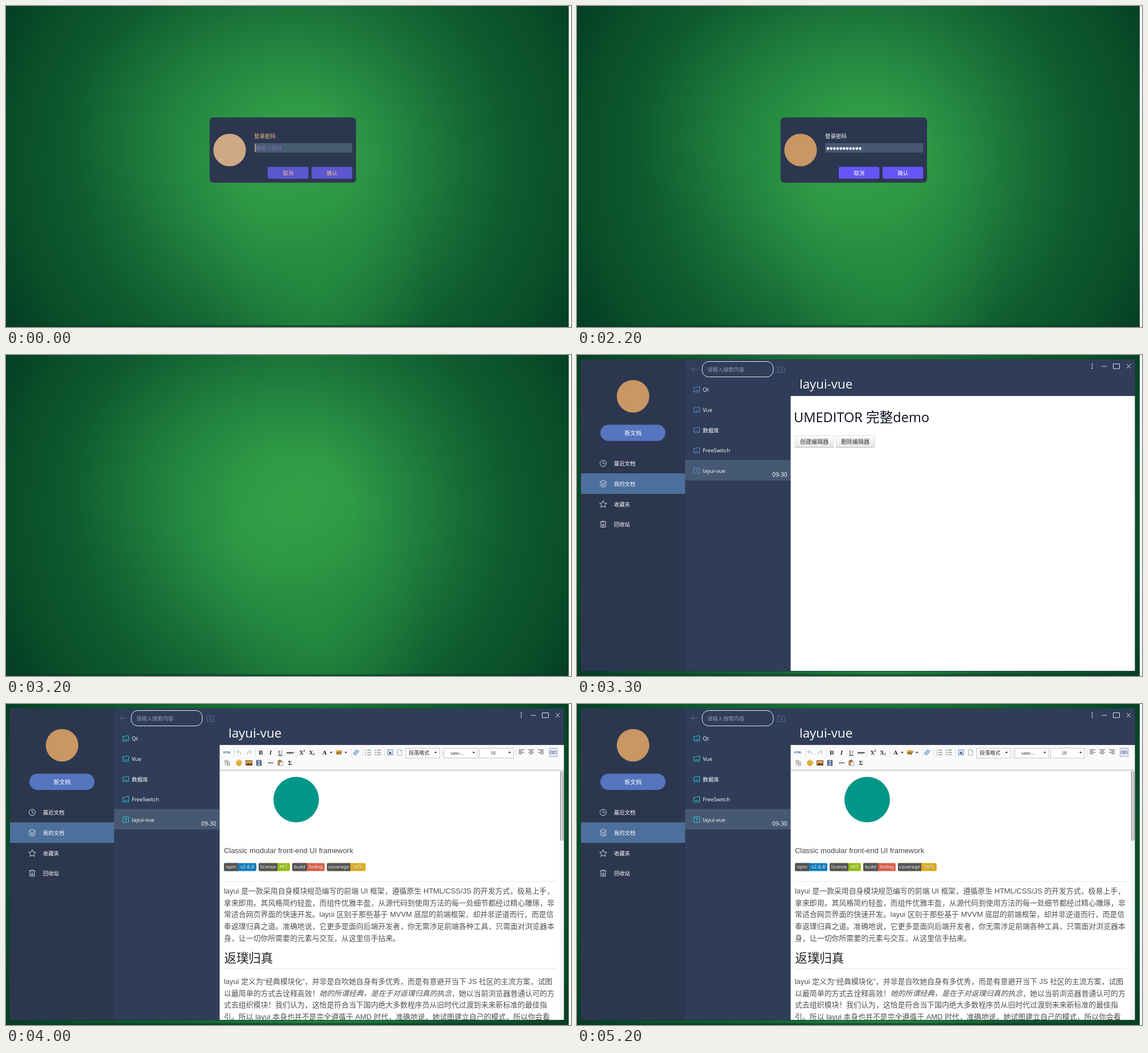
An HTML page for the animation above (5300 ms loop, 993 by 564 pixels).

```html
<!DOCTYPE html>
<html lang="zh-CN">
<head>
<meta charset="utf-8">
<title>Notes login</title>
<style>
html, body { margin: 0; width: 100%; height: 100%; overflow: hidden; background: #fff; }
svg { position: absolute; left: 0; top: 0; display: block; }
#bg {
  position: absolute; left: 0; top: 0; width: 989px; height: 564px;
  background:
    linear-gradient(#0000 561px, #0a3a25b0 561px),
    radial-gradient(ellipse 190px 260px at 550px 490px, #27903f99, #27903f00),
    radial-gradient(ellipse 230px 200px at 320px 200px, #2590404d, #25904000),
    radial-gradient(circle at 503px 272px, #35a24a 0, #309b47 100px, #238440 200px,
      #176c36 300px, #0e5a2e 390px, #0a5029 480px, #043e25 570px);
}
.ui { font-family: "Open Sans", "Noto Sans CJK SC", "Noto Sans CJK", sans-serif; }
.doc { font-family: "Liberation Sans", "Noto Sans CJK SC", "Noto Sans CJK", sans-serif; }
.serif { font-family: "Liberation Serif", serif; }
.badge { font-family: "DejaVu Sans", sans-serif; }
text { white-space: pre; }
</style>
</head>
<body>
<div id="bg"></div>
<svg id="stage" width="993" height="564" viewBox="0 0 993 564"></svg>
<script>
const LOOP = 5300, STEP = 100;

// Drawing helpers
const rect = (x, y, w, h, fill, r = 0, more = '') =>
  `<rect x="${x}" y="${y}" width="${w}" height="${h}" rx="${r}" style="fill:${fill}" ${more}/>`;
const disc = (x, y, r, fill, more = '') =>
  `<circle cx="${x}" cy="${y}" r="${r}" style="fill:${fill}" ${more}/>`;
const line = (d, color, w = 1, more = '') =>
  `<path d="${d}" style="fill:none;stroke:${color};stroke-width:${w}" ${more}/>`;
const text = (x, y, size, s, fill, cls = 'ui', more = '') =>
  `<text x="${x}" y="${y}" font-size="${size}" class="${cls}" style="fill:${fill}" ${more}>${s}</text>`;
const mid = 'text-anchor="middle"', bold = 'font-weight="700"';
const group = (id, body) => `<g id="${id}">${body}</g>`;

function dialog() {
  const button = (x, s) => rect(x, 282.5, 71.5, 21, 'var(--btn)', 3) +
    text(x + 36, 297, 9.4, s, 'var(--txt)', 'ui', mid);
  let dots = '';
  for (let i = 0; i < 11; i++) dots += disc(441 + i * 5.66, 250.4, 2.3, '#fff', 'class="dot"');
  return rect(357.5, 195.5, 258, 115.5, '#1c504080', 7) +
    rect(358, 196, 257, 114, '#2c374f', 6) +
    disc(393, 253, 28.6, 'var(--ava)') +
    text(436, 232.4, 9.4, '登录密码', 'var(--txt)') +
    rect(436, 241, 172.5, 16.5, 'var(--field)') +
    group('hint', text(438, 253.2, 9.4, '请输入密码', 'var(--hint)')) + dots +
    rect(438, 242, 1, 14, 'var(--txt)', 0, 'id="caret"') +
    button(460, '取消') + button(537, '确认');
}

function sidebar() {
  const icons = [
    'M40.5 190.5a5.5 5.5 0 1 0 11 0a5.5 5.5 0 1 0 -11 0M46 187v4h3.5',
    'M46 220l6 3.2l-6 3.2l-6 -3.2zM40 226.3l6 3.2l6 -3.2M40 229.3l6 3.2l6 -3.2',
    'M46 256l1.9 4l4.3 .5l-3.2 3l.9 4.4l-3.9 -2.2l-3.9 2.2l.9 -4.4l-3.2 -3l4.3 -.5z',
    'M40.5 293h11M42 293v9.5h8v-9.5M44 292h4M44 300l2 -3.5l2 3.5z'
  ];
  const names = ['最近文档', '我的文档', '收藏夹', '回收站'];
  return rect(7, 8, 183, 547, '#2c374f') + disc(98.5, 72.5, 28.6, '#c99664') +
    rect(41, 122.5, 114.5, 28.5, '#5675bf', 14.2) +
    text(98.4, 140.7, 10, '新文档', '#fff', 'ui', mid) +
    rect(7, 208, 183, 36, '#4d6f9c') +
    names.map((s, i) => text(65, 194.2 + i * 35.7, 9.4, s, '#fff') +
      line(icons[i], '#e8ecf2', .9)).join('');
}

function list() {
  const names = ['Qt', 'Vue', '数据库', 'FreeSwitch', 'layui-vue'];
  const icon = (y, last) => last
    ? `M205.5 ${y - 5}h10v10h-10zM208 ${y - 2}h5M210.5 ${y - 2}v5`
    : `M205.5 ${y + 4.5}v-8h5l1 -1.2h4v9.2zM207.5 ${y + 2}h6`;
  return rect(190, 8, 185.5, 547, '#303d58') +
    line('M211.5 25h-10.5M206 20l-5 5l5 5', '#62718c') +
    rect(220, 11.5, 125, 27, '#303d58', 11.5, 'stroke="#e4e8ee"') +
    text(229, 28.6, 9.3, '请输入搜索内容', '#929caf') +
    line('M353 30.5v-10h4.5l1.2 1.5h6.3v8.5zM359 24v4.5M356.7 26.2h4.6', '#536d9b') +
    rect(190, 184.5, 185.5, 36, '#465972') +
    names.map((s, i) => {
      const y = 60.5 + i * 35.65;
      return line(icon(y, i == 4), 'var(--icon)') + text(221, y + 3.8, 9.5, s, '#fff');
    }).join('') +
    text(343, 214, 10.2, '09-30', '#fff');
}

function header() {
  return rect(375, 8, 605.5, 64, '#303d58') + text(391, 59, 22.3, 'layui-vue', '#fff') +
    [15.7, 19.5, 23.3].map(y => disc(905.5, y, 1, '#fff')).join('') +
    line('M922.5 20h8.5M942.5 15.5h11v8.5h-11zM966 16l7 7.5M973 16l-7 7.5', '#dde3ec');
}

function demo() {
  const button = (x, s) => rect(x, 141.5, 68, 21, 'url(#face)', 2, 'stroke="#e2dada"') +
    line(`M${x} 162.5h68`, '#c4bfbf') + text(x + 34, 155.8, 10, s, '#333', 'ui', mid);
  return text(381, 118, 23.6, 'UMEDITOR 完整demo', '#0b0f1c') +
    button(383, '创建编辑器') + button(455, '删除编辑器');
}

function toolbar() {
  const ink = '#222', blue = '#4a78b8';
  const drop = (x, y = 85) => `<path d="M${x - 2.2} ${y - 1}h4.4l-2.2 2.8z" fill="#222"/>`;
  const glyph = (x, s, size = 11, more = '', y = 89) =>
    text(x, y, size, s, ink, 'serif', mid + ' ' + more);
  const select = (x, s, cls, size) => rect(x + .5, 77.5, 59.5, 17.5, '#fff', 0, 'stroke="#c4c4c4"') +
    text(x + 24, 89.3, size, s, ink, cls, mid) + drop(x + 53);
  const rows = (x, w, dx, color = '#555') => w.map((n, i) =>
    line(`M${x + dx * (10 - n)} ${80.5 + i * 2.3}h${n}`, color)).join('');
  const bars = [401, 438, 509, 549, 607, 627, 665, 766, 896]
    .map(x => line(`M${x}.5 78v15`, '#dcdcdc')).join('');
  const numbers = [81, 85, 89].map((y, i) =>
    text(631, y + 1.5, 4, i + 1, blue, 'doc') + line(`M635 ${y}h7`, '#666') +
    disc(649.5, y, 1, blue) + line(`M652 ${y}h7`, '#666')).join('');
  const row1 = text(388.5, 86.5, 4.8, 'HTML', '#3b62a8', 'doc', mid + ' ' + bold) +
    line('M406 84h4.5q3 .5 2 5M408.5 81l-3 3l3 3', '#b9cde2', 1.4) +
    line('M430.5 84h-4.5q-3 .5 -2 5M428 81l3 3l-3 3', '#b9cde2', 1.4) +
    glyph(448, 'B', 11, bold) + glyph(465, 'I', 11, bold + ' font-style="italic"') +
    glyph(482, 'U', 10.5, 'text-decoration="underline"') +
    text(499.5, 87.6, 6, 'ABC', ink, 'doc', mid) + line('M493 85.5h13', ink, .9) +
    glyph(519, 'X', 10, bold) + glyph(524, '2', 6, bold, 84) +
    glyph(536, 'X', 10, bold) + glyph(541.5, '2', 6, bold, 90) +
    glyph(560, 'A', 11, bold) + drop(571.5) +
    rect(580, 81, 9, 8, '#f5b84d') + text(585, 87.5, 7.5, 'ab', ink, 'doc', mid) +
    line('M587 89l4 -7', '#8a5c20', 1.2) + drop(597.5) +
    '<path d="M610 87l6 -7l4.5 3.2l-6 7z" fill="#a9c9e8" stroke="#5c7da5" stroke-width=".8"/>' +
    numbers + rect(670.5, 80.5, 9, 9, '#dbe9f8', 0, 'stroke="#6c90ba"') +
    text(675, 88, 8, 'a', '#223', 'doc', mid + ' ' + bold) +
    line('M688 80h5l2.5 2.5v7.5h-7.5zM693 80v2.5h2.5', '#9aa6b4', .9) +
    select(702, '段落格式', 'ui', 9) + select(769, 'sans-...', 'serif', 8.2) +
    select(832, '18', 'serif', 8.6) +
    rows(901, [10, 6, 10, 6], 0) + rows(918, [10, 6, 10, 6], .5) + rows(935, [10, 6, 10, 6], 1) +
    rect(954.5, 77.5, 14.5, 15, '#dfe5f7', 0, 'stroke="#a9b5da"') +
    rect(956.5, 83, 5.5, 4, 'none', 2, 'stroke="#667"') +
    rect(961.5, 83, 5.5, 4, 'none', 2, 'stroke="#667"');
  const row2 = disc(387, 101.5, 2.4, '#e8e8e8', 'stroke="#777"') +
    disc(391, 106, 2.4, '#e8e8e8', 'stroke="#777"') + line('M390 100l4 2M384 105l3 3', '#888') +
    disc(409.5, 103.5, 5, '#f7c548', 'stroke="#cf9027" stroke-width=".8"') +
    disc(407.7, 102, .8, '#543') + disc(411.3, 102, .8, '#543') +
    line('M406.7 104.5q2.8 3 5.6 0', '#754b15', .9) +
    rect(421.5, 99.5, 11, 8, '#e6a14a', 0, 'stroke="#6b4b32"') +
    '<path d="M422 107l3.5 -4l3 2.5l2 -2l2 3.5z" fill="#5c4327"/>' +
    rect(440, 98.5, 9, 10, '#46516a') + rect(442, 99.5, 5, 3.5, '#9fbce8') +
    rect(442, 104, 5, 3.5, '#9fbce8') + line('M460 103.5h10', ink, 1.1) +
    rect(477.5, 99, 7.5, 9, '#bd7b3c') + rect(479.5, 98, 3.5, 2, '#777') +
    rect(481, 102, 6, 6.5, '#f3f5fa', 0, 'stroke="#8390aa" stroke-width=".7"') +
    glyph(499, 'Σ', 11, bold, 107);
  return rect(376, 116, 604, 2.5, '#e3e3e3') + rect(376, 72, 604, 43.5, '#fafafa') +
    line('M376 115.5h604', '#cfcfcf') + bars + row1 + row2;
}

function badge(x, split, end, a, b, color) {
  const label = (l, r, s) => text((l + r) / 2, 290.1, 7.9, s, '#0005', 'badge', mid) +
    text((l + r) / 2, 289.4, 7.9, s, '#fff', 'badge', mid);
  return rect(x, 279.5, end - x, 14, color, 2) + rect(x, 279.5, split - x, 14, '#555', 2) +
    rect(split - 2, 279.5, 2, 14, '#555') + label(x, split, a) + label(split, end, b);
}

function article() {
  const para = (y, lines) => lines.map((s, i) =>
    text(383, y + i * 20.65, 12.92, s, '#505050', 'doc', 'font-weight="300"')).join('');
  const intro = [
    'layui 是一款采用自身模块规范编写的前端 UI 框架,遵循原生 HTML/CSS/JS 的开发方式,极易上手,',
    '拿来即用。其风格简约轻盈,而组件优雅丰盈,从源代码到使用方法的每一处细节都经过精心雕琢,非',
    '常适合网页界面的快速开发。layui 区别于那些基于 MVVM 底层的前端框架,却并非逆道而行,而是信',
    '奉返璞归真之道。准确地说,它更多是面向后端开发者,你无需涉足前端各种工具,只需面对浏览器本',
    '身,让一切你所需要的元素与交互,从这里信手拈来。'
  ];
  const origin = [
    'layui 定义为“经典模块化”,并非是自吹她自身有多优秀,而是有意避开当下 JS 社区的主流方案,试图',
    '以最简单的方式去诠释高效!<tspan font-style="italic">她的所谓经典,是在于对返璞归真的执念</tspan>,她以当前浏览器普通认可的方',
    '式去组织模块!我们认为,这恰是符合当下国内绝大多数程序员从旧时代过渡到未来新标准的最佳指',
    '引。所以 layui 本身也并不是完全遵循于 AMD 时代,准确地说,她试图建立自己的模式,所以你会看'
  ];
  const wide = s => s.replace(/,/g, '\uff0c').replace(/!/g, '\uff01');
  return disc(510, 168, 40, '#009688') +
    text(383, 262, 12.9, 'Classic modular front-end UI framework', '#444', 'doc') +
    badge(383, 408, 440, 'npm', 'v2.6.8', '#0f7dc0') +
    badge(444, 477, 499, 'license', 'MIT', '#94c014') +
    badge(503, 529, 560, 'build', 'failing', '#dc5f49') +
    badge(564, 605, 632, 'coverage', '50%', '#d9ab20') +
    line('M383 312h584M383 465.5h584', '#e4e4e4') +
    para(333, intro.map(wide)) +
    text(383.5, 454, 21.4, '返璞归真', '#222', 'doc', 'font-weight="500"') +
    para(492, origin.map(wide)) +
    rect(973, 116, 7, 439, '#f6f6f6') +
    rect(974.5, 117.5, 4.5, 122, '#d2d2d2', 2, 'stroke="#8c8c8c"');
}

const stage = document.getElementById('stage');
stage.innerHTML =
  `<defs><linearGradient id="face" x2="0" y2="1"><stop stop-color="#fff"/>
   <stop offset="1" stop-color="#e6e4e4"/></linearGradient>
   <clipPath id="pane"><rect x="375" y="72" width="605.5" height="483"/></clipPath></defs>` +
  group('login', dialog()) +
  group('app', rect(6, 7.5, 975, 548.5, '#1f3a3acc') + sidebar() + list() + header() +
    rect(375.5, 72, 605, 483, '#fff') + group('demo', demo()) +
    `<g id="editor" clip-path="url(#pane)">${article()}${toolbar()}</g>`);

// Colours that settle: name, start time, first and last RGB
const tints = [
  ['--txt', 0, [240, 192, 136], [255, 255, 255]],
  ['--ava', 0, [207, 169, 134], [201, 150, 100]],
  ['--btn', 0, [92, 86, 207], [102, 85, 246]],
  ['--hint', 0, [139, 104, 192], [150, 161, 182]],
  ['--field', 0, [69, 92, 111], [70, 88, 114]],
  ['--icon', 3300, [88, 136, 200], [40, 196, 212]]
];
const typing = [[1300, 2], [1400, 4], [1500, 6], [1600, 9], [1700, 11]];
const blink = [[0, 500], [1000, 2200], [2700, 2900]];

const $ = id => document.getElementById(id);
const show = (el, on) => { el.style.display = on ? '' : 'none'; };
const dots = [...document.querySelectorAll('.dot')];

function render(t) {
  for (const [name, start, a, b] of tints) {
    const k = Math.min(1, Math.max(0, (t - start) / 600));
    stage.style.setProperty(name, `rgb(${a.map((v, i) => Math.round(v + (b[i] - v) * k))})`);
  }
  const typed = typing.reduce((n, [at, count]) => t >= at ? count : n, 0);
  show($('login'), t < 2900);
  show($('hint'), !typed);
  dots.forEach((d, i) => show(d, i < typed));
  show($('caret'), blink.some(([a, b]) => t >= a && t < b));
  $('caret').setAttribute('x', Math.round(438 + typed * 5.7));
  show($('app'), t >= 3300);
  show($('demo'), t < 3500);
  show($('editor'), t >= 3500);
}

function tick() {
  const t = performance.now() % LOOP;
  render(Math.floor(t / STEP) * STEP);
  requestAnimationFrame(tick);
}
tick();
</script>
</body>
</html>
```
